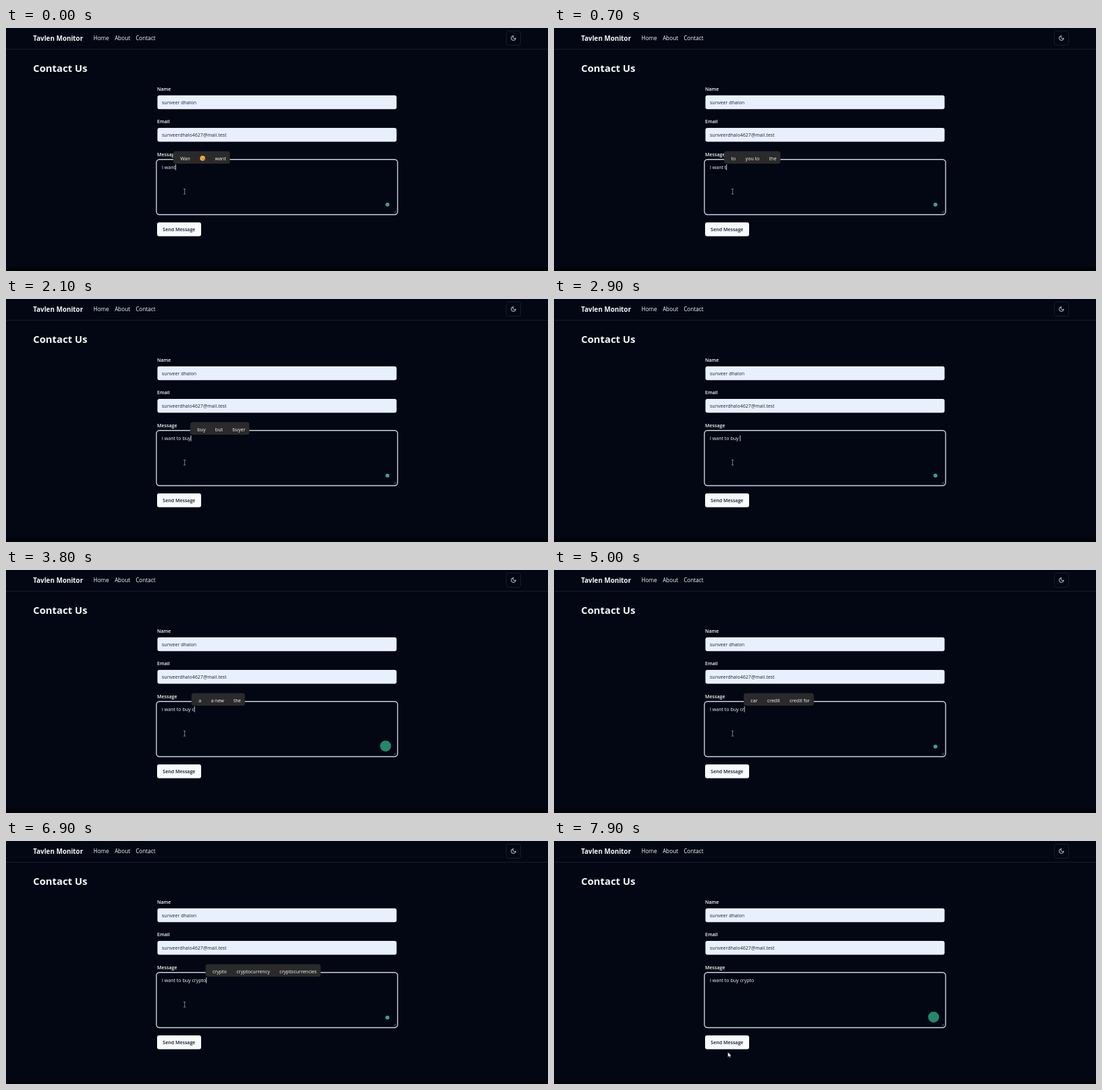
An HTML page that plays this animation: 800 by 360 pixels, repeating every 8000 ms.

```html
<!DOCTYPE html>
<html lang="en">
<head>
<meta charset="utf-8">
<title>Contact Us</title>
<style>
  html, body { margin: 0; width: 800px; height: 360px; overflow: hidden; background: #020713; }
  svg { display: block; font-family: "Open Sans", "Noto Sans", sans-serif; fill: #f8fafc; }
  text { white-space: pre; }
  .brand { font-size: 9.8px; font-weight: 700; }
  .nav { font-size: 8.1px; }
  .title { font-size: 14.8px; font-weight: 700; }
  .label { font-size: 7.05px; font-weight: 600; }
  .body { font-size: 7.05px; }
  .field { fill: #e8f0fe; }
  .dark { fill: #1b2433; }
</style>
</head>
<body>
<svg width="800" height="360" viewBox="0 0 800 360">
  <rect width="800" height="360" fill="#020713"/>
  <rect y="355" width="800" height="5" fill="#010206"/>

  <text class="brand" x="40" y="19">Tavlen Monitor</text>
  <g class="nav">
    <text x="129" y="18.2">Home</text>
    <text x="160.5" y="18.2">About</text>
    <text x="191.5" y="18.2">Contact</text>
  </g>
  <rect y="31" width="800" height="1" fill="#141c2b"/>
  <rect x="738.5" y="4.5" width="21" height="21" rx="3" fill="none" stroke="#151d2c"/>
  <path d="M749 11.6a2.3 2.3 0 0 0 3.4 3.4a3.4 3.4 0 1 1-3.4-3.4z" fill="none" stroke="#f8fafc" stroke-width=".8" stroke-linejoin="round"/>

  <text class="title" x="40" y="64.8">Contact Us</text>
  <g class="label">
    <text x="223" y="93">Name</text>
    <text x="223" y="141.3">Email</text>
    <text x="223" y="189.8">Message</text>
  </g>
  <rect class="field" x="223.5" y="99.8" width="353" height="20.4" rx="3"/>
  <rect class="field" x="223.5" y="148" width="353" height="20.4" rx="3"/>
  <g class="body dark">
    <text x="230" y="113">sunveer dhalon</text>
    <text x="230" y="161.3">sunveerdhalo4627@mail.test</text>
  </g>

  <rect x="222" y="194.8" width="356" height="81.7" rx="4.5" fill="none" stroke="#ccd3de" stroke-width="1.4"/>
  <path d="M572.6 273.8l3-3M574.4 273.9l1.3-1.3" stroke="#a9afb8" stroke-width=".6"/>
  <text id="msg" class="body" x="230" y="208.8"></text>
  <rect id="caret" y="202" width=".8" height="8.6"/>
  <circle id="badge"/>

  <rect x="223" y="288" width="65" height="20.6" rx="3"/>
  <text class="label" style="fill:#0f172a" x="231.3" y="301">Send Message</text>

  <g id="popup"></g>
  <text id="ruler" class="body" visibility="hidden"></text>

  <g id="beam" fill="none" stroke="#a4a8af" stroke-width=".7">
    <path d="M-1.7-3.7H1.7M0-3.7V3.7M-1.7 3.7H1.7"/>
  </g>
  <path id="arrow" d="M0 0V7.4L1.8 5.8L3 8.4L4.2 7.9L3.1 5.4H5.3Z" stroke="#1a1a1a" stroke-width=".5"/>
</svg>
<script>
const LOOP = 8000, TEXT_X = 230, FULL = "I want to buy crypto";
const byId = id => document.getElementById(id);
const [msg, caret, badge, popup, ruler, beam, arrow] =
  ["msg", "caret", "badge", "popup", "ruler", "beam", "arrow"].map(byId);

// [start ms, typed letters]
const typing = [[0, 6], [300, 7], [700, 8], [900, 9], [1100, 10], [1200, 11], [1400, 12],
  [2000, 13], [2500, 14], [3700, 15], [4600, 16], [5300, 17], [5700, 18], [6000, 19], [6500, 20]];

// [start ms, letters at the popup's left edge, suggestions]; "*" is a face
const hints = [
  [0, 5, "Wan|*kiss|want"], [400, 7, "to|you to|the"], [800, 0, ""],
  [1300, 11, "be|buy|bring"], [1700, 12, "buy|bus|buyers"],
  [2100, 13, "buy|but|buyer"], [2600, 0, ""], [3300, 14, "a|a new|the"],
  [4100, 15, "can|car|change"], [4800, 16, "car|credit|credit for"],
  [5500, 17, "cry|crying|*cry"], [5900, 18, "crypt|crypto|*monkey"],
  [6200, 19, "crypt|crypto|cryptic"], [6700, 20, "crypto|cryptocurrency|cryptocurrencies"],
  [7300, 0, ""]
];

const bigBadge = t => (t >= 3700 && t < 4700) || t >= 7500;
const at = (rows, t) => rows.filter(r => r[0] <= t).pop();

function set(el, attrs) {
  for (const k in attrs) el.setAttribute(k, attrs[k]);
}

function add(tag, attrs, text) {
  const el = document.createElementNS("http://www.w3.org/2000/svg", tag);
  set(el, attrs);
  if (text) el.textContent = text;
  popup.appendChild(el);
  return el;
}

function width(text) {
  if (!text) return 0;
  ruler.textContent = text.replace(/ /g, "\u00a0");
  return ruler.getComputedTextLength();
}

const edge = n => TEXT_X + width(FULL.slice(0, n));

function face(x, kind) {
  const cx = x + 4, cy = 193;
  add("circle", { cx, cy, r: 3.8, fill: kind === "monkey" ? "#c99a4b" : "#f3b83c" });
  if (kind === "monkey") add("ellipse", { cx, cy: cy + .9, rx: 2.6, ry: 2, fill: "#f2d9a8" });
  for (const side of [-1.4, 1.4])
    add("circle", { cx: cx + side, cy: cy - .8, r: .55, fill: "#5c3a17" });
  add("circle", { cx: cx + .3, cy: cy + 1.6, r: .8, fill: kind === "kiss" ? "#d6453d" : "#7a4a1d" });
  if (kind === "kiss") add("circle", { cx: cx + 2.9, cy: cy + 1.7, r: 1.1, fill: "#d6453d" });
  if (kind === "cry") add("circle", { cx: cx - 1.8, cy: cy + 1, r: .9, fill: "#6bb7ea" });
}

function drawPopup([, letters, list]) {
  popup.replaceChildren();
  if (!list) return;
  const left = edge(letters) - .7;
  const box = add("rect", { x: left, y: 182.6, height: 18.4, rx: 3.5, fill: "#2b2a2b" });
  let x = left + 10.4;
  for (const word of list.split("|")) {
    if (word[0] === "*") {
      face(x, word.slice(1));
      x += 8;
    } else {
      add("text", { class: "body", x, y: 195.5 }, word);
      x += width(word);
    }
    x += 14.3;
  }
  set(box, { width: x - 14.3 + 5.8 - left });
}

let shownHint, shownText;

function draw(t) {
  const hint = at(hints, t), letters = at(typing, t)[1];
  if (hint !== shownHint) drawPopup(shownHint = hint);
  if (letters !== shownText) {
    shownText = letters;
    msg.textContent = FULL.slice(0, letters);
    set(caret, { x: edge(letters) });
  }
  set(caret, { visibility: t < 7600 ? "visible" : "hidden" });
  set(badge, bigBadge(t)
    ? { cx: 560.3, cy: 260.8, r: 8.1, fill: "#23886a" }
    : { cx: 563, cy: 261.6, r: 2.9, fill: "#3aa58a" });

  // the pointer leaves the text area near the end
  const p = Math.min(1, Math.max(0, Math.floor((t - 7400) / 100) / 5));
  const k = p * p * (3 - 2 * p);
  const y = 242.3 + 70.5 * k;
  const inside = y < 277;
  set(beam, { transform: `translate(${263.6 - 7 * k} ${y})`, visibility: inside ? "visible" : "hidden" });
  set(arrow, { transform: `translate(${263.6 - 7 * k} ${y})`, visibility: inside ? "hidden" : "visible" });
}

const start = performance.now();
function tick() {
  draw((performance.now() - start) % LOOP);
  requestAnimationFrame(tick);
}
tick();
</script>
</body>
</html>
```
